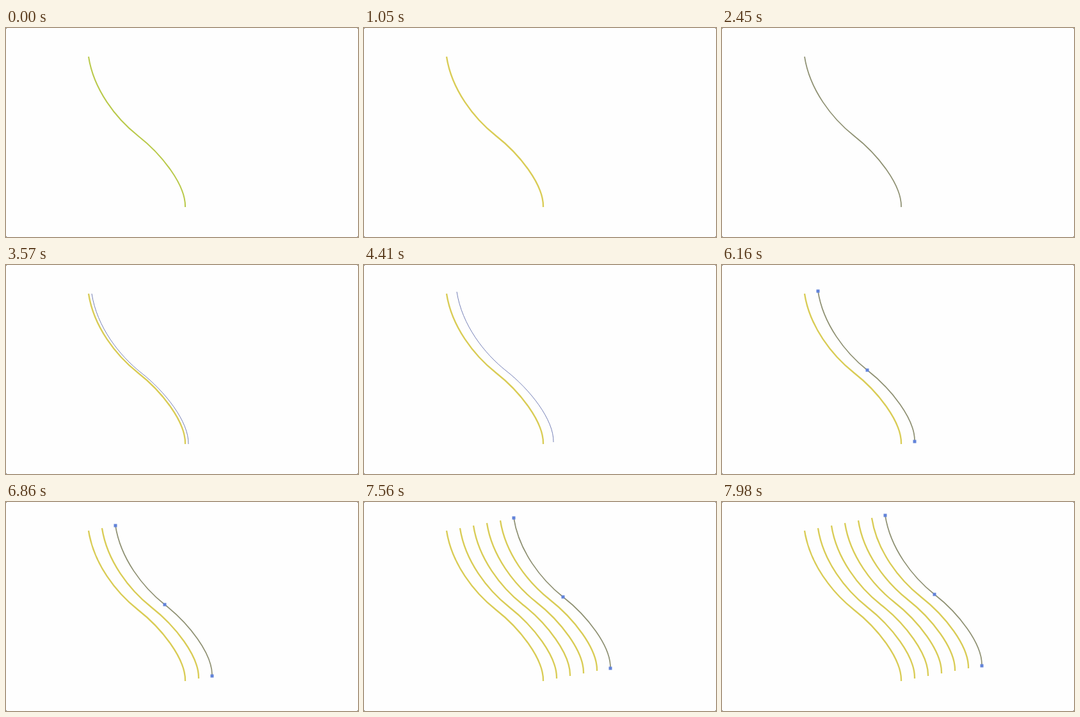
Recreate the animation shown at these times as an HTML page. Size 550x328 px, loop 8 s.

```html
<!DOCTYPE html>
<html lang="en">
<head>
<meta charset="utf-8">
<title>Repeated curve</title>
<style>
  html, body { margin: 0; width: 100%; height: 100%; overflow: hidden; background: #444; }
  svg { display: block; width: 100vw; height: 100vh; background: #fefefe; border-radius: 2px; }
  use { fill: none; stroke: #d9cc55; stroke-width: 2.3; }
  .fresh { stroke: #b9c94a; stroke-width: 2; }
  .selected { stroke: #8e9072; stroke-width: 1.7; }
  #outline { stroke: #5361a5; stroke-width: .8; }
  #anchors { fill: #6283d9; }
</style>
</head>
<body>
<svg viewBox="0 0 550 328">
  <defs>
    <path id="curve" d="M129 45C137 97 172 142 206 169C243 198 281 246 280 281"/>
  </defs>
  <g id="copies"></g>
  <use id="outline" href="#curve"/>
  <g id="anchors">
    <rect x="126.5" y="42.5" width="5" height="5"/>
    <rect x="203.5" y="166.5" width="5" height="5"/>
    <rect x="277.5" y="278.5" width="5" height="5"/>
  </g>
</svg>
<script>
const LOOP = 8000, TICK = 70;
const STEP = { x: 21, y: -4 };
const SELECT = 2450, DRAG_START = 3570, DRAG_END = 4830, DROP = 5950;
const birth = [0, DROP, 6860, 7140, 7350, 7560, 7840];

const byId = id => document.getElementById(id);
const outline = byId('outline'), anchors = byId('anchors');
const show = (el, on) => el.setAttribute('visibility', on ? 'visible' : 'hidden');
const move = (el, x, y) => el.setAttribute('transform', `translate(${x} ${y})`);

const copies = birth.map((_, i) => {
  const copy = document.createElementNS('http://www.w3.org/2000/svg', 'use');
  copy.setAttribute('href', '#curve');
  move(copy, STEP.x * i, STEP.y * i);
  byId('copies').append(copy);
  return copy;
});

function styleOf(i, last, t) {
  if (i !== last) return '';
  if (i > 0) return 'selected';
  if (t < 2 * TICK) return 'fresh';
  return t >= SELECT && t < DRAG_START ? 'selected' : '';
}

function draw(now) {
  const t = Math.floor(now % LOOP / TICK) * TICK;
  const last = birth.filter(start => t >= start).length - 1;

  copies.forEach((copy, i) => {
    show(copy, i <= last);
    copy.setAttribute('class', styleOf(i, last, t));
  });

  // The dragged outline already sits 5px away when it first appears.
  const p = Math.min(1, Math.max(0, (t - DRAG_START) / (DRAG_END - DRAG_START)));
  move(outline, Math.round(5 + (STEP.x - 5) * p), Math.round(STEP.y * p));
  show(outline, t >= DRAG_START && t < DROP);

  move(anchors, STEP.x * last, STEP.y * last);
  show(anchors, last > 0);
}

const start = performance.now();
function frame() {
  draw(performance.now() - start);
  requestAnimationFrame(frame);
}
frame();
</script>
</body>
</html>
```
